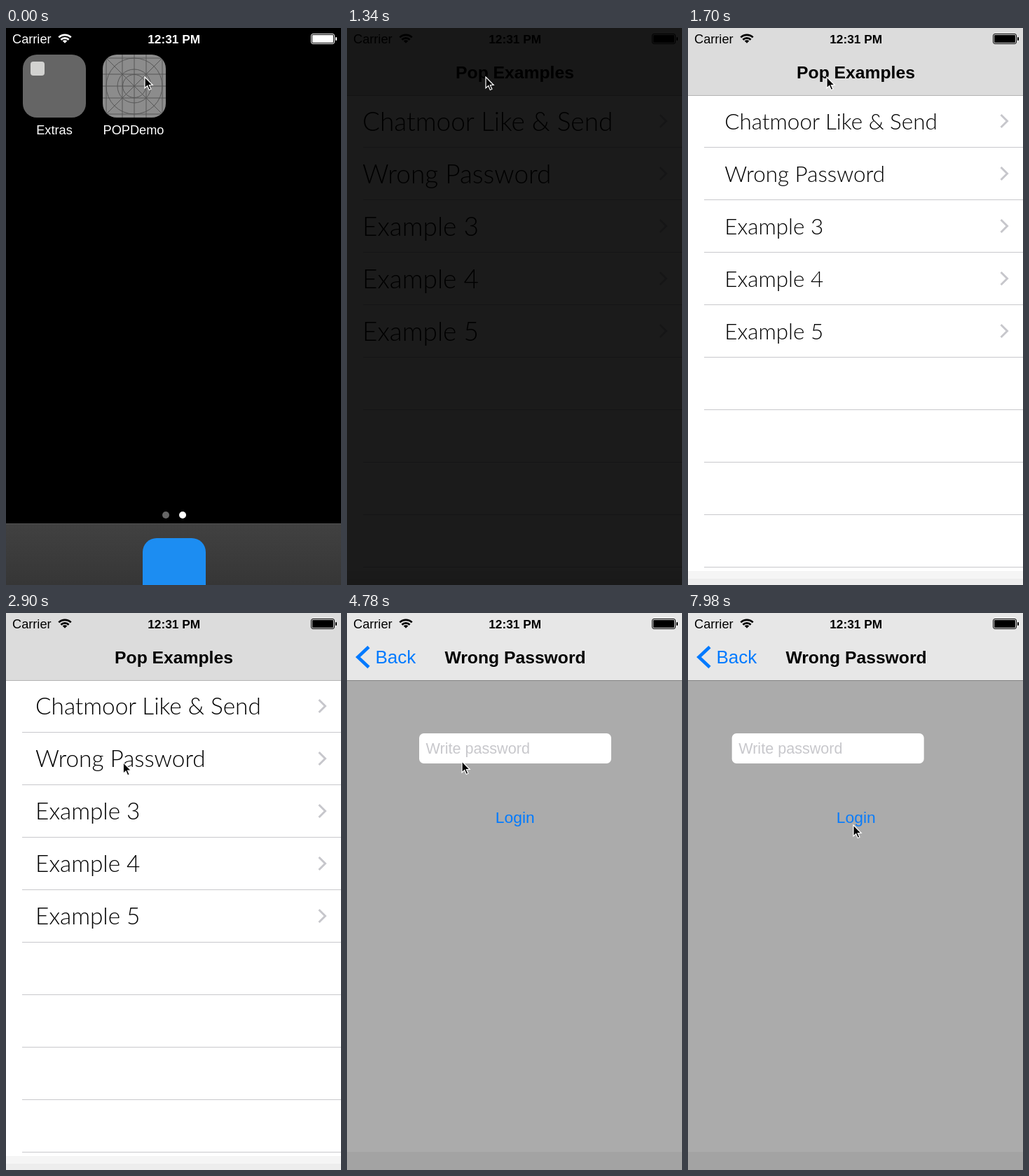
Recreate the animation shown at these times as an HTML page. Size 478 px wide and 796 px high, loop 8000 ms.

```html
<!DOCTYPE html>
<html lang="en">
<head>
<meta charset="utf-8">
<title>Pop Examples</title>
<style>
  html, body { margin: 0; width: 100%; height: 100%; overflow: hidden; background: #000; }
  svg { display: block; width: 100%; height: 100%; }
  text { font-family: "Liberation Sans", Arial, sans-serif; white-space: pre; }
  .title { font-size: 24.7px; font-weight: bold; text-anchor: middle; }
  .label { font-size: 18.2px; text-anchor: middle; fill: #fff; }
  .cell { font: 300 37px Lato, "Open Sans", sans-serif; }
  .line { fill: none; }
</style>
</head>
<body>
<svg viewBox="0 0 478 796">
  <defs>
    <g id="status">
      <text x="9" y="22" font-size="18.2">Carrier</text>
      <g class="line" stroke="currentColor" stroke-width="2.7">
        <path d="M75.3 13.4A12.3 12.3 0 0 1 92.7 13.4M78.4 16.7A7.8 7.8 0 0 1 89.6 16.7"/>
      </g>
      <path d="M84 21.8L80.7 18.5A4.7 4.7 0 0 1 87.3 18.5Z"/>
      <text x="239.7" y="22" font-size="17.3" font-weight="bold" text-anchor="middle">12:31 PM</text>
      <rect class="line" x="435.5" y="8.5" width="33" height="14" rx="2.5" stroke="currentColor"/>
      <rect x="437" y="10" width="30" height="11" rx="1"/>
      <rect x="470" y="13" width="2" height="5" rx="1"/>
    </g>
    <linearGradient id="dock" x2="0" y2="1">
      <stop stop-color="#414141"/><stop offset="1" stop-color="#363636"/>
    </linearGradient>
    <linearGradient id="shade">
      <stop stop-opacity="0"/><stop offset="1" stop-opacity=".08"/>
    </linearGradient>
    <clipPath id="tile"><rect x="138" y="38" width="90" height="90" rx="20"/></clipPath>
  </defs>

  <rect width="478" height="796"/>

  <g id="home">
    <g id="springboard">
      <rect x="24" y="38" width="90" height="90" rx="20" fill="#656565"/>
      <rect x="35" y="48" width="20" height="20" rx="4" fill="#d2d2d0"/>
      <text class="label" x="69" y="152">Extras</text>
      <g clip-path="url(#tile)">
        <rect x="138" y="38" width="90" height="90" fill="#8c8c8c"/>
        <g id="grid" class="line" stroke="#575757">
          <circle cx="183" cy="83" r="40"/>
          <circle cx="183" cy="83" r="24"/>
          <circle cx="183" cy="83" r="16.5"/>
          <path d="M138 38l90 90M228 38l-90 90"/>
        </g>
      </g>
      <text class="label" x="182" y="152" font-size="18">POPDemo</text>
      <circle cx="228" cy="696" r="5" fill="#666"/>
      <circle cx="252" cy="696" r="5" fill="#fff"/>
      <rect y="708" width="478" height="88" fill="url(#dock)"/>
      <rect y="708" width="478" height="1" fill="#555"/>
      <rect x="195" y="729" width="90" height="90" rx="20" fill="#1c8df2"/>
    </g>
    <use href="#status" fill="#fff" color="#fff"/>
  </g>

  <g id="app">
    <g id="list">
      <rect y="96" width="478" height="700" fill="#fff"/>
      <rect y="776" width="478" height="11" fill="#f5f5f5"/>
      <rect y="787" width="478" height="9" fill="#ededed"/>
      <g id="rows"></g>
      <rect id="dim" y="96" width="478" height="700"/>
    </g>
    <rect y="0" width="478" height="96" fill="#dcdcdc"/>
    <rect y="96" width="478" height="1" fill="#b4b4b4"/>
    <g id="login">
      <rect x="-14" y="97" width="14" height="699" fill="url(#shade)"/>
      <rect width="480" height="96" fill="#e7e7e7"/>
      <rect y="96" width="480" height="700" fill="#ababab"/>
      <rect y="96" width="480" height="1" fill="#848484"/>
      <rect y="770" width="480" height="26" fill="#a3a3a3"/>
      <g id="field">
        <rect x="103" y="172" width="274" height="43" rx="6.5" fill="#fff"/>
        <text x="112.5" y="200.5" font-size="21.6" fill="#c8c8cc">Write password</text>
      </g>
      <text id="button" x="239.7" y="299.5" font-size="22.9" text-anchor="middle" fill="#007aff">Login</text>
    </g>
    <text id="oldTitle" class="title" x="239.5" y="72">Pop Examples</text>
    <text id="newTitle" class="title" x="240" y="72">Wrong Password</text>
    <path id="arrow" class="line" d="M31 48.5L15.5 63L31 77.5" stroke="#007aff" stroke-width="4.6"/>
    <text id="back" x="40.5" y="72" font-size="26" fill="#007aff">Back</text>
    <use href="#status"/>
  </g>

  <path id="cursor" d="M0 0V16L3.7 12.6L6.3 18.5L8.9 17.3L6.3 11.5H11.2Z" stroke="#fff" stroke-width="1.2"/>
</svg>

<script>
const LOOP = 8000, W = 478;
const $ = id => document.getElementById(id);
const clamp = x => Math.min(1, Math.max(0, x));
const part = (t, from, to) => clamp((t - from) / (to - from));
const smooth = u => u * u * (3 - 2 * u);
const move = (el, x, y = 0) => el.setAttribute('transform', `translate(${x} ${y})`);
const fade = (el, a) => el.setAttribute('opacity', a);

function add(parent, tag, attrs, text = '') {
  const el = document.createElementNS('http://www.w3.org/2000/svg', tag);
  for (const k in attrs) el.setAttribute(k, attrs[k]);
  el.textContent = text;
  return parent.appendChild(el);
}

for (const d of [-40, -17, 0, 17, 40])
  add($('grid'), 'path', { d: `M${183 + d} 38v90M138 ${83 + d}h90` });

const names = ['Chatmoor Like & Send', 'Wrong Password', 'Example 3', 'Example 4', 'Example 5'];
const cells = names.map((name, i) => {
  const y = 75 * i;
  add($('rows'), 'path', { class: 'line', d: `M446.5 ${124 + y}l9 9l-9 9`, stroke: '#c7c7cc', 'stroke-width': 3 });
  return add($('rows'), 'text', { class: 'cell', x: 22, y: 146.5 + y }, name);
});
for (let y = 170; y < 796; y += 75)
  add($('rows'), 'rect', { x: 23, y, width: 455, height: 1, fill: '#c8c8cc' });

// Damped spring around zero: offset x0, speed v0 per second
const DAMP = 5.55, FREQ = 17.6;
function spring(ms, x0, v0) {
  if (ms <= 0) return x0;
  if (ms > 1200) return 0;
  const s = ms / 1000;
  return Math.exp(-DAMP * s) *
    (x0 * Math.cos(FREQ * s) + (v0 + DAMP * x0) / FREQ * Math.sin(FREQ * s));
}

function push(t) {
  if (t <= 3900) return 0;
  if (t >= 4560) return 1;
  const k = 15 * (t - 3900) / 1000;
  return 1 - (1 + k) * Math.exp(-k);
}

// start, end, x, y
const stops = [[0, 0, 198, 70], [2200, 2380, 218, 237], [2680, 2940, 164, 212], [5180, 5520, 236, 303]];
function pointer(t) {
  let [, , x, y] = stops[0];
  for (const [from, to, nx, ny] of stops.slice(1)) {
    const u = smooth(part(t, from, to));
    x += (nx - x) * u;
    y += (ny - y) * u;
  }
  move($('cursor'), x, y);
}

// press, release
const taps = [[5760, 6030], [7540, 7730]];

function drawHome(t) {
  const u = smooth(part(t, 20, 440));
  const s = 1 + 4.3 * u;
  const cx = 183 + 56 * u, cy = 83 + 315 * u;
  $('springboard').setAttribute('transform', `translate(${cx} ${cy}) scale(${s}) translate(-183 -83)`);
  fade($('home'), 1 - u);
}

function drawCells(t) {
  cells.forEach((cell, i) => {
    let s = 0.9 + spring(t - 1480, 0.1, t > 1480 ? 2 : 0);
    if (i === 1 && t > 3920) s = 0.9 + spring(t - 3920, 0, 2);
    const cy = 133.5 + 75 * i;
    cell.setAttribute('transform', `translate(223 ${cy}) scale(${s}) translate(-223 ${-cy})`);
  });
}

function drawPush(t) {
  const p = push(t), q = 1 - p;
  move($('list'), -0.3 * W * p);
  fade($('dim'), 0.09 * p);
  move($('login'), W * q + (p ? 0 : 20));
  move($('oldTitle'), -98 * p);
  fade($('oldTitle'), clamp(1 - 1.3 * p));
  move($('newTitle'), 377 * q);
  fade($('newTitle'), p);
  move($('back'), 159 * q);
  fade($('back'), p);
  fade($('arrow'), p ** 3);
}

function drawLogin(t) {
  let x = 0, alpha = 1;
  for (const [down, up] of taps) {
    if (t < down) continue;
    x = spring(t - up, 0, 2988);
    alpha = t < up ? 1 - 0.75 * part(t, down, down + 100) : 1 - 0.75 * (1 - part(t, up, up + 350)) ** 2;
  }
  move($('field'), x);
  fade($('button'), alpha);
}

function draw(t) {
  drawHome(t);
  fade($('app'), part(t, 1316, 1556));
  drawCells(t);
  drawPush(t);
  drawLogin(t);
  pointer(t);
}

const start = performance.now();
function tick() {
  draw((performance.now() - start) % LOOP);
  requestAnimationFrame(tick);
}
draw(0);
requestAnimationFrame(tick);
</script>
</body>
</html>
```
